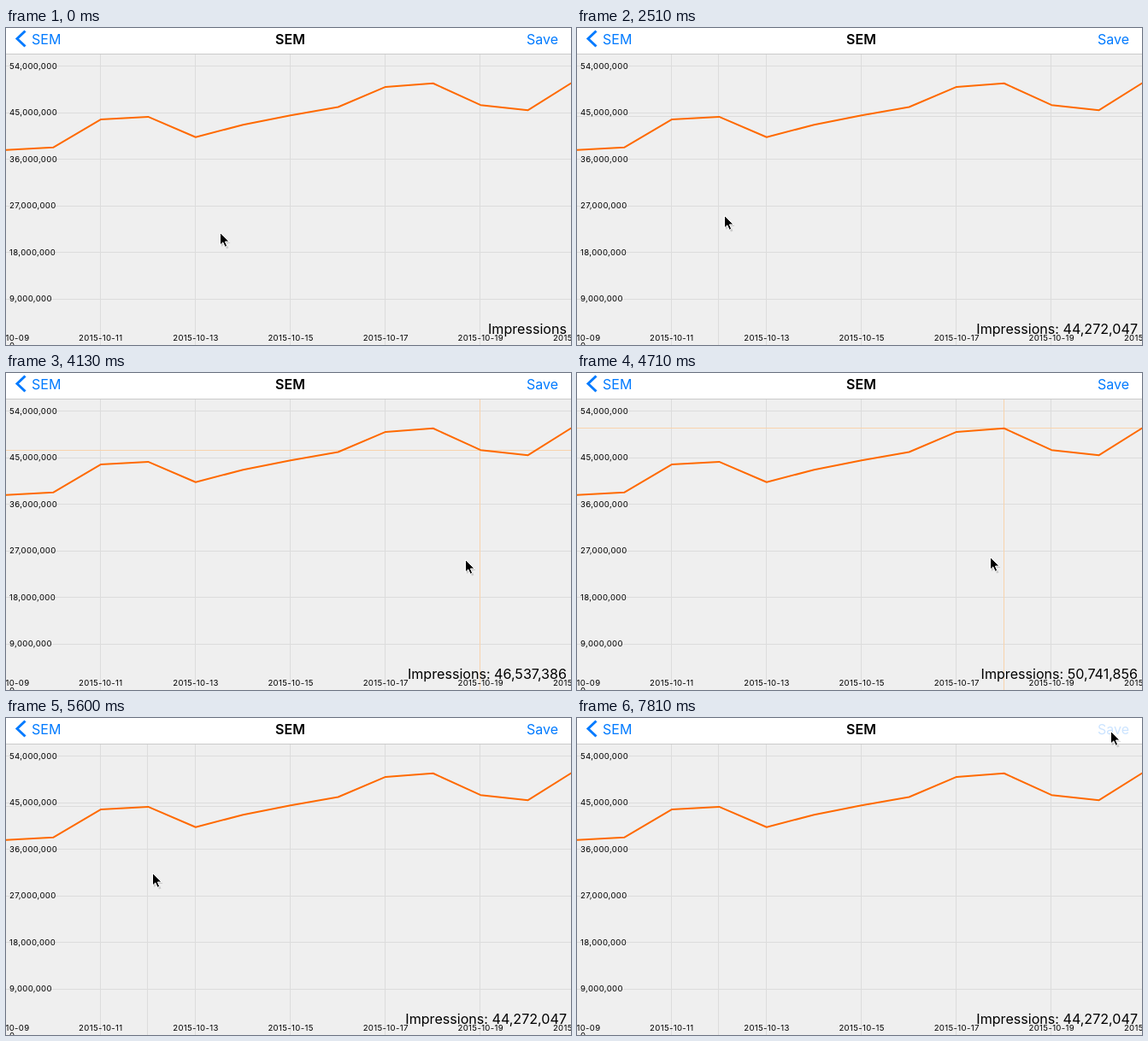
Write an HTML page that moves like this. It is 661 px wide and 371 px high and loops after 8 s.

```html
<!DOCTYPE html>
<html lang="en">
<head>
<meta charset="utf-8">
<title>Impressions chart</title>
<style>
  html, body { margin: 0; width: 100%; height: 100%; overflow: hidden; background: #efefef; }
  svg { display: block; font: 16px Inter, Roboto, sans-serif; }
  .axis { font-size: 9.6px; letter-spacing: .035em; }
  .blue { fill: #007aff; }
  rect { shape-rendering: crispEdges; }
</style>
</head>
<body>
<svg width="661" height="371" viewBox="0 0 661 371">
  <rect width="661" height="371" fill="#efefef"/>
  <g id="grid" fill="#dcdcdc"></g>
  <g id="cross">
    <rect id="crossX" y="30" width="1" height="341"/>
    <rect id="crossY" width="661" height="1"/>
  </g>
  <polyline id="line" fill="none" stroke="#ff6a00" stroke-width="2" stroke-linejoin="round"/>
  <g id="labels" class="axis"></g>
  <text id="readout" x="656" y="358.2" text-anchor="end" style="font-size:16.1px"></text>
  <rect width="661" height="30" fill="#fff"/>
  <rect y="30" width="661" height="1" fill="#cacaca"/>
  <path d="M22.5 3.5L13 12.5L22.5 21.5" fill="none" stroke="#007aff" stroke-width="3"/>
  <text class="blue" x="30" y="19">SEM</text>
  <text x="332.5" y="19" text-anchor="middle" font-weight="600">SEM</text>
  <text id="save" class="blue" x="646" y="19" text-anchor="end">Save</text>
  <g id="cursor">
    <path d="M2 3V17L5.5 14L8 19.5L10.5 18.5L8 13H12.5Z" opacity=".15"/>
    <path d="M.5 .5V15L3.8 11.9L6.2 17.3L8.7 16.2L6.4 11H11Z" stroke="#fff"/>
  </g>
</svg>
<script>
const $ = id => document.getElementById(id);
const LOOP = 8000, STEP = 147.2;
const DAY = 55.56, HOME = 3;
const PRESS = 16, RELEASE = 38, TAP = 53;

// Daily impressions, in millions
const values = [37.84, 38.34, 43.75, 44.272047, 40.331764, 42.730183, 44.554574,
  46.154907, 50.049312, 50.741856, 46.537386, 45.542190, 51.3];
const dayX = i => i * DAY - 0.9;
const valueY = v => 371.5 - v * 54.5 / 9;
const commas = v => Math.round(v * 1e6).toLocaleString('en-US');

// Cursor moves: from step, to step, to x, to y
const home = [250, 239];
const moves = [
  [0, 5, 96, 205], [7, 11, 489, 235], [11, 16, 166, 219],
  [16, 29.5, 550, 218], [29.8, 38, 171, 181], [42, 47, 616, 57], [48, 52, 624, 15]
];

function buildChart() {
  let grid = '', labels = '';
  for (let v = 0; v <= 54; v += 9) {
    const y = valueY(v);
    grid += `<rect y="${Math.floor(y)}" width="661" height="1"/>`;
    labels += `<text x="4" y="${y + 3}">${commas(v)}</text>`;
  }
  for (let i = 0; i < values.length; i += 2) {
    const x = dayX(i), day = String(9 + i).padStart(2, '0');
    grid += `<rect x="${Math.floor(x)}" y="30" width="1" height="341"/>`;
    labels += `<text x="${x + .6}" y="366.3" text-anchor="middle">2015-10-${day}</text>`;
  }
  $('grid').innerHTML = grid;
  $('labels').innerHTML = labels;
  $('line').setAttribute('points', values.map((v, i) => [dayX(i) + .5, valueY(v) + .5]).join(' '));
}

function cursorAt(step) {
  let [x, y] = home;
  for (const [from, to, toX, toY] of moves) {
    const u = Math.min(1, Math.max(0, (step - from) / (to - from)));
    if (!u) break;
    x += (toX - x) * u * u * (3 - 2 * u);
    y += (toY - y) * u * u;
  }
  return [x, y];
}

function draw(now) {
  const step = Math.floor(now % LOOP / STEP);
  const [x, y] = cursorAt(step).map(Math.round);
  $('cursor').setAttribute('transform', `translate(${x} ${y})`);

  const active = step >= PRESS;
  $('cross').style.display = active ? '' : 'none';
  let text = 'Impressions';
  if (active) {
    const touchX = cursorAt(Math.min(step, RELEASE))[0];
    const i = Math.round((touchX + 20) / DAY);
    $('crossX').setAttribute('x', Math.floor(dayX(i)));
    $('crossY').setAttribute('y', Math.round(valueY(values[i])));
    $('cross').setAttribute('fill', i === HOME ? '#dcdcdc' : '#f8d3ad');
    text += ': ' + commas(values[i]);
  }
  $('readout').textContent = text;
  $('save').setAttribute('opacity', step >= TAP ? .2 : 1);
  requestAnimationFrame(draw);
}

buildChart();
requestAnimationFrame(draw);
</script>
</body>
</html>
```
